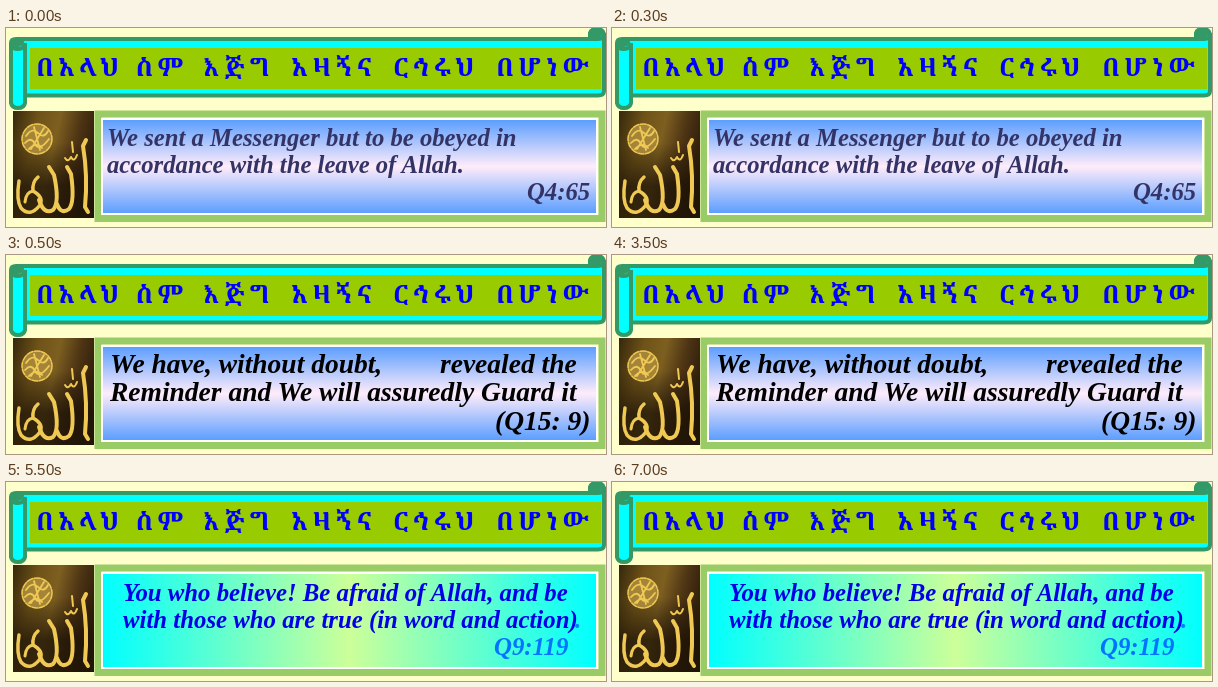
An HTML page for the animation above (8 s loop, 600 by 199 pixels).

```html
<!DOCTYPE html>
<html lang="en">
<head>
<meta charset="utf-8">
<title>Verses</title>
<style>
  html, body { margin: 0; width: 100%; height: 100%; overflow: hidden; background: #ffffcc; }
  svg { display: block; width: 600px; height: 199px; }
  .banner { font: bold 25px "Noto Serif Ethiopic", "Noto Sans Ethiopic", "Noto Serif", serif; letter-spacing: 5px; text-anchor: middle; fill: #0000ff; }
  .verse { font: italic bold 24.7px "Liberation Serif", "Times New Roman", serif; white-space: pre; }
  .slide { opacity: 0; }
  .gold { fill: none; stroke: #efc954; stroke-linecap: round; stroke-linejoin: round; }
</style>
</head>
<body>
<svg viewBox="0 0 600 199">
  <defs>
    <linearGradient id="sky" x2="0" y2="1">
      <stop offset="0" stop-color="#5c9eff"/>
      <stop offset=".5" stop-color="#ffecfa"/>
      <stop offset="1" stop-color="#5c9eff"/>
    </linearGradient>
    <linearGradient id="glow">
      <stop offset="0" stop-color="#00ffff"/>
      <stop offset=".5" stop-color="#ccff99"/>
      <stop offset="1" stop-color="#00ffff"/>
    </linearGradient>
    <linearGradient id="bronze" x2="1" y2=".3">
      <stop offset="0" stop-color="#36280c"/>
      <stop offset=".3" stop-color="#6e5218"/>
      <stop offset=".55" stop-color="#7d5f20"/>
      <stop offset=".8" stop-color="#4d3414"/>
      <stop offset="1" stop-color="#33200c"/>
    </linearGradient>
    <linearGradient id="shade" x2="0" y2="1">
      <stop offset=".3" stop-color="#1c1206" stop-opacity="0"/>
      <stop offset=".7" stop-color="#1c1206" stop-opacity=".75"/>
    </linearGradient>
  </defs>

  <rect width="600" height="199" fill="#ffffcc"/>

  <g fill="#00ffff" stroke="#339966" stroke-width="4">
    <path d="M5 15Q5 11 10 11H584V5Q585 1 591 1T598 6V63Q598 67.5 592 67.5H19V75Q18 80 12 80T5 75Z"/>
    <path d="M5 16Q6 21 12 21T19 15V68M584 11H592Q598 11 598 5" fill="none"/>
    <path d="M6 14Q12 9 18 13Q18 18 12 19T6 14ZM586 4Q591 0 596 4Q597 9 591 10H586Z" fill="#339966" stroke="none"/>
  </g>
  <rect x="24" y="20" width="571" height="41" fill="#99cc00"/>
  <g class="banner" id="banner"></g>

  <g>
    <rect x="7" y="83" width="81" height="107" fill="url(#bronze)"/>
    <rect x="7" y="83" width="81" height="107" fill="url(#shade)"/>
    <circle cx="31" cy="111" r="15" fill="#a38438"/>
    <g class="gold">
      <circle cx="31" cy="111" r="15" stroke-width="1.5" stroke-dasharray="6 1.5"/>
      <path d="M20 108Q26 99 32 105T42 103M19 115Q25 108 29 116T43 111M23 121Q31 113 36 120M28 99L34 122M38 100L25 121" stroke-width="1.8"/>
      <path d="M80 112L77 118Q82 148 79 179L82 184" stroke-width="4"/>
      <path d="M61 139L65 146Q69 174 63 181Q55 187 51 176" stroke-width="4"/>
      <path d="M43 139L48 147Q54 174 47 182Q38 187 33 172" stroke-width="4"/>
      <path d="M32 149Q26 154 27 163Q38 169 34 177Q24 190 15 180Q10 172 13 153" stroke-width="3.5"/>
      <path d="M27 163Q20 164 19 174" stroke-width="3"/>
      <path d="M59 130Q62 135 65 129Q68 135 71 127M66 114L67 124" stroke-width="2"/>
    </g>
  </g>

  <rect x="92" y="86" width="504" height="104.5" fill="none" stroke="#99cc66" stroke-width="7"/>
  <rect x="95" y="90" width="497" height="97" fill="#fff"/>
  <g id="slides"></g>
</svg>

<script>
const LOOP = 8000;
const LEFT = 97, TOP = 92, WIDTH = 493, HEIGHT = 93;

// [word, centre]
const bannerWords = [
  ["በአላህ", 74], ["ስም", 156], ["እጅግ", 233],
  ["አዛኝና", 328], ["ርኅሩህ", 430], ["በሆነው", 539]
];

// Each line: [text, x, baseline, optional colour]
const slides = [
  { from: 0, to: 500, paint: "url(#sky)", color: "#333366", size: 24.7, lines: [
    ["We sent a Messenger but to be obeyed in", 101, 118],
    ["accordance with the leave of Allah.", 101, 145],
    ["Q4:65", 521, 172]
  ] },
  { from: 500, to: 5500, paint: "url(#sky)", color: "#000", size: 27.5, lines: [
    ["We have, without doubt,", 104, 118],
    ["revealed the", 434, 118],
    ["Reminder and We will assuredly Guard it", 104, 146],
    ["(Q15: 9)", 489, 175]
  ] },
  { from: 5500, to: 8000, paint: "url(#glow)", color: "#0000e6", size: 24.8, lines: [
    ["You who believe! Be afraid of Allah, and be", 117, 119],
    ["with those who are true (in word and action)", 117, 146],
    [".", 569, 146, "#0080ff"],
    ["Q9:119", 488, 173, "#0073ff"]
  ] }
];

function add(parent, tag, attrs, text = "") {
  const node = document.createElementNS("http://www.w3.org/2000/svg", tag);
  for (const [key, value] of Object.entries(attrs)) node.setAttribute(key, value);
  node.textContent = text;
  return parent.appendChild(node);
}

const banner = document.getElementById("banner");
for (const [word, x] of bannerWords) add(banner, "text", { x, y: 48 }, word);

const stage = document.getElementById("slides");
for (const { from, to, paint, color, size, lines } of slides) {
  const group = add(stage, "g", { class: "slide" });
  add(group, "rect", { x: LEFT, y: TOP, width: WIDTH, height: HEIGHT, fill: paint });
  for (const [text, x, y, fill = color] of lines) {
    add(group, "text", { class: "verse", x, y, fill, style: `font-size:${size}px` }, text);
  }
  const steps = [{ opacity: from === 0 ? 1 : 0, offset: 0 }];
  if (from > 0) steps.push({ opacity: 1, offset: from / LOOP });
  if (to < LOOP) steps.push({ opacity: 0, offset: to / LOOP });
  steps.push({ opacity: to < LOOP ? 0 : 1, offset: 1 });
  group.animate(steps.map(step => ({ ...step, easing: "step-end" })), {
    duration: LOOP, iterations: Infinity
  }).startTime = 0;
}
</script>
</body>
</html>
```
